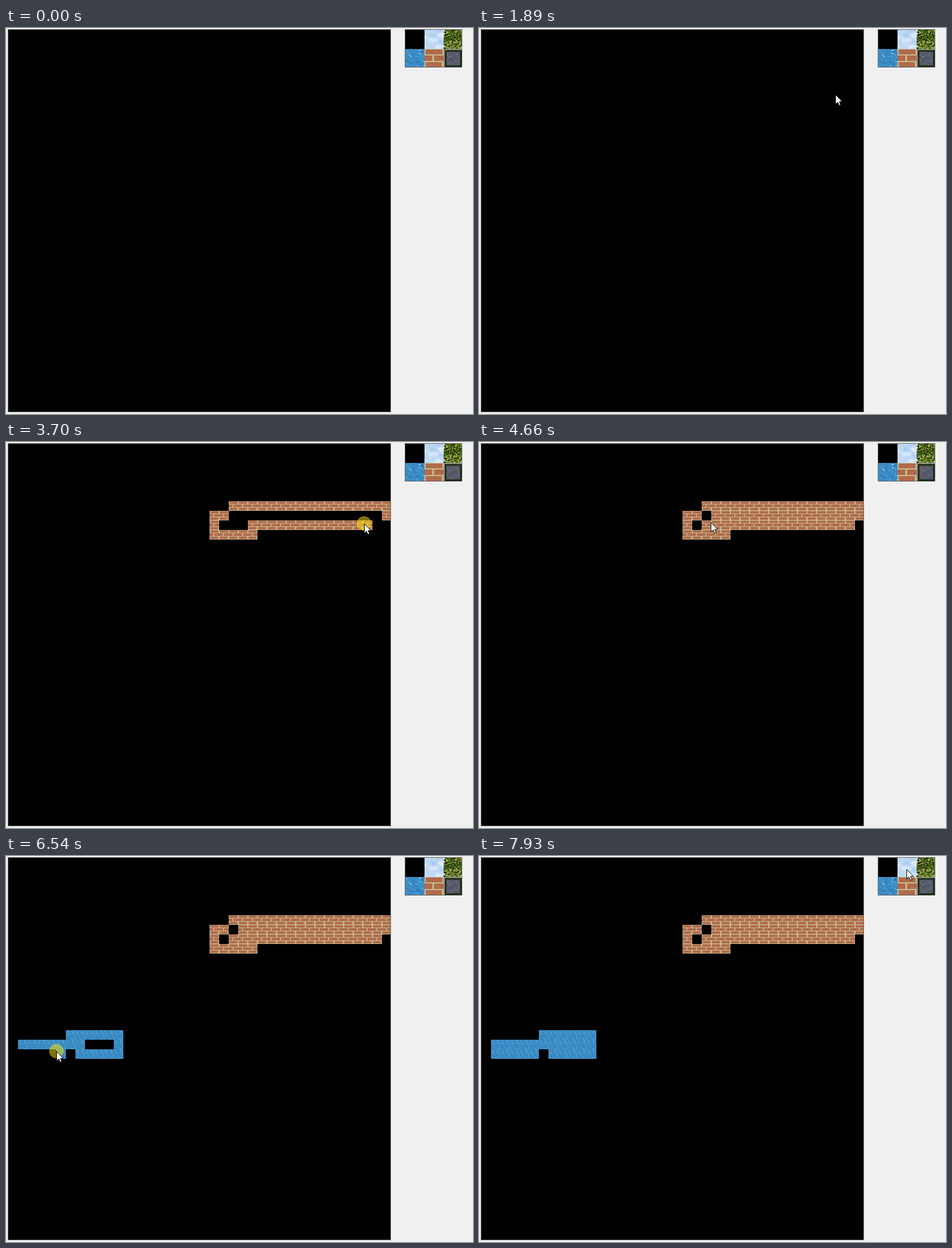
Recreate the animation shown at these times as an HTML page with a canvas. Size 780 by 645 pixels, loop 8 s.

```html
<!DOCTYPE html>
<html lang="en">
<head>
<meta charset="utf-8">
<title>Tile map editor</title>
<style>
  html, body { margin: 0; width: 100%; height: 100%; overflow: hidden; background: #f0f0f0; }
  canvas { display: block; }
</style>
</head>
<body>
<canvas id="stage" width="780" height="645"></canvas>
<script>
const ctx = document.getElementById('stage').getContext('2d');
const LOOP = 8000, CELL = 16, LEFT = 4, TOP = 3;

let seed = 7;
const random = () => (seed = (seed * 16807) % 2147483647) / 2147483647;
const pick = list => list[Math.floor(random() * list.length)];

// Each texture is a 32 px square.
function texture(base, paint) {
  const canvas = document.createElement('canvas');
  canvas.width = canvas.height = 32;
  const c = canvas.getContext('2d');
  const rect = (color, x, y, w, h) => { c.fillStyle = color; c.fillRect(x, y, w, h); };
  rect(base, 0, 0, 32, 32);
  paint(c, rect);
  return canvas;
}

const empty = texture('#000', () => {});

const sky = texture('#bfd9f5', c => {
  for (let i = 0; i < 26; i++) {
    const x = random() * 32, y = random() * 32, r = 3 + random() * 5;
    const glow = c.createRadialGradient(x, y, 0, x, y, r);
    const color = pick(['235,243,253', '168,202,240', '220,234,250']);
    glow.addColorStop(0, `rgba(${color},.75)`);
    glow.addColorStop(1, `rgba(${color},0)`);
    c.fillStyle = glow;
    c.fillRect(0, 0, 32, 32);
  }
});

const leaves = texture('#4f6a1c', (c, rect) => {
  const greens = ['#24380a', '#3a5212', '#53701c', '#6d8a2a', '#8c9c3c', '#a8ae5c', '#182606'];
  for (let i = 0; i < 260; i++)
    rect(pick(greens), random() * 32 | 0, random() * 32 | 0, 2 + random() * 2 | 0, 2);
  for (const y of [0, 5, 26]) rect('#e8eadc', 0, y, 2, 3);
  rect('#e8eadc', 29, 29, 2, 3);
});

const water = texture('#3a8bc4', (c, rect) => {
  for (let i = 0; i < 75; i++) {
    const x = random() * 36 - 4, y = random() * 36 - 3, length = 2 + random() * 5;
    c.strokeStyle = pick(['#2a74ae', '#2f7fba', '#4a9bd0', '#5ca9da', '#80bfe4']);
    c.lineWidth = .8 + random() * .5;
    c.beginPath();
    c.moveTo(x, y);
    c.lineTo(x + length, y + length * .6);
    c.stroke();
  }
  rect('#e4f2fa', 22, 2, 4, 1);
  rect('#e4f2fa', 8, 12, 2, 1);
});

const brick = texture('#c6b98c', (c, rect) => {
  function block(x, y, w, h) {
    rect('#b06a4c', x, y, w, h);
    for (let i = 0; i < w * h / 7; i++)
      rect(pick(['#bb7556', '#a86144', '#b57050']), x + random() * (w - 2), y + random() * (h - 1), 2, 1);
  }
  block(2, 1, 28, 8);
  block(0, 11, 13, 9);
  block(16, 11, 16, 9);
  block(2, 22, 27, 8);
});

const plate = texture('#8b9189', (c, rect) => {
  rect('#0c1408', 2, 2, 28, 28);
  rect('#2c3a24', 3, 3, 26, 26);
  rect('#595b6b', 5, 5, 22, 22);
  for (let i = 0; i < 70; i++)
    rect(pick(['#505264', '#646678', '#6d7080', '#4c5060']), 5 + random() * 20, 5 + random() * 20, 2, 1.5);
  rect('#8a8e9c', 9, 12, 4, 1);
  rect('#8a8e9c', 20, 8, 3, 1);
});

const palette = [empty, sky, leaves, water, brick, plate];

// Pointer path: time, x, y.
const path = [
  [530, 775, 428], [810, 762, 215], [1090, 732, 58], [1280, 726, 45], [1350, 731, 45],
  [1825, 586, 107], [1895, 595, 111], [2150, 634, 119], [2240, 635, 107], [2960, 377, 110],
  [2991, 367, 120], [3070, 345, 140], [3130, 350, 150], [3275, 412, 150], [3300, 413, 138],
  [3700, 598, 136], [3840, 620, 138], [3930, 617, 120], [4500, 398, 117], [4590, 390, 141],
  [4660, 387, 134], [4933, 660, 62], [5002, 704, 58], [5070, 695, 56], [5138, 692, 57],
  [5412, 333, 216], [5690, 196, 296], [5850, 106, 301], [5881, 94, 313], [5960, 32, 315],
  [6045, 94, 313], [6076, 106, 301], [6180, 188, 303], [6260, 189, 333], [6330, 188, 333],
  [6440, 121, 330], [6460, 119, 318], [6484, 106, 317], [6515, 94, 329], [6540, 84, 326],
  [6640, 26, 327], [6690, 28, 313], [7000, 189, 315], [7100, 149, 311], [7500, 430, 160],
  [7930, 714, 22]
];

const presses = [
  { from: 1270, to: 1390 },
  { from: 2140, to: 4658, tile: brick },
  { from: 5060, to: 5120 },
  { from: 5700, to: 7030, tile: water }
];

function pointerAt(time) {
  const next = path.findIndex(point => point[0] > time);
  if (next < 0) return path.at(-1).slice(1);
  const [t0, x0, y0] = path[next - 1], [t1, x1, y1] = path[next];
  const k = (time - t0) / (t1 - t0);
  return [x0 + (x1 - x0) * k, y0 + (y1 - y0) * k];
}

// Follow every painting stroke once and note when each cell is first touched.
const cells = new Map();
for (const { from, to, tile } of presses.filter(press => press.tile)) {
  for (let time = from; time < to; time += 2) {
    const [x, y] = pointerAt(time);
    const col = Math.floor((x - LEFT) / CELL), row = Math.floor((y - TOP) / CELL);
    const key = col + ',' + row;
    if (!cells.has(key)) cells.set(key, { time, col, row, tile });
  }
}

const sections = [530, 1350, 2170, 3000, 3840, 4660, 5480, 6330, 7170, LOOP];
function stepTime(time) {
  const i = sections.findIndex(start => start > time) - 1;
  if (i < 0) return 0;
  const start = sections[i], step = (sections[i + 1] - start) / 12;
  return start + step * Math.min(11, Math.floor((time - start) / step + .15));
}

const arrow = new Path2D('M.5 .5V16.5L4.2 13L6.6 18.6L9.2 17.5L6.8 12H11.6Z');

function drawPointer(time) {
  const [x, y] = pointerAt(time).map(Math.round);
  if (presses.some(({ from, to }) => time >= from && time < to)) {
    ctx.fillStyle = 'rgba(255,230,0,.5)';
    ctx.beginPath();
    ctx.arc(x, y, 12, 0, Math.PI * 2);
    ctx.fill();
  }
  ctx.save();
  ctx.translate(x, y);
  ctx.fillStyle = '#fff';
  ctx.strokeStyle = '#000';
  ctx.fill(arrow);
  ctx.stroke(arrow);
  ctx.restore();
}

function draw(time) {
  ctx.lineWidth = 1;
  ctx.fillStyle = '#f0f0f0';
  ctx.fillRect(0, 0, 780, 645);
  ctx.fillStyle = '#000';
  ctx.fillRect(3, 2, 640, 640);
  for (const cell of cells.values())
    if (cell.time <= time)
      ctx.drawImage(cell.tile, LEFT + cell.col * CELL, TOP + cell.row * CELL, CELL, CELL);
  palette.forEach((tile, i) => ctx.drawImage(tile, 667 + i % 3 * 32, 3 + Math.floor(i / 3) * 32));
  ctx.fillStyle = '#f0f0f0';
  ctx.fillRect(643, 0, 20, 645);
  ctx.fillRect(762, 0, 18, 70);
  ctx.fillRect(660, 66, 120, 4);
  ctx.strokeStyle = '#646464';
  ctx.strokeRect(3.5, 2.5, 639, 639);
  ctx.strokeRect(666.5, 2.5, 95, 63);
  if (time >= sections[0]) drawPointer(time);
}

const startTime = performance.now();
function frame() {
  draw(stepTime((performance.now() - startTime) % LOOP));
  requestAnimationFrame(frame);
}
frame();
</script>
</body>
</html>
```
